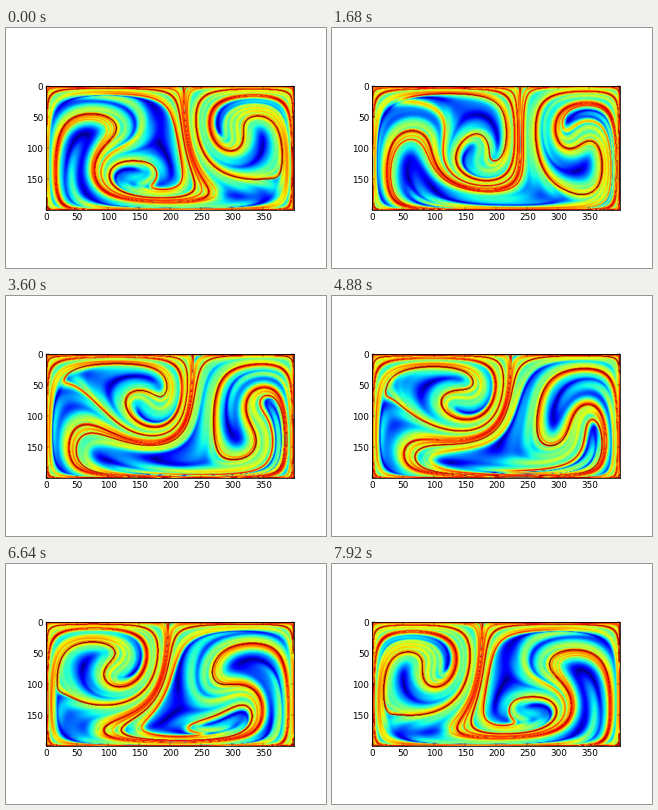
A matplotlib script that plays this animation: 320x240 px, repeating every 8000 ms.

```python
"""Finite-time Lyapunov exponent of the time-periodic double gyre."""
import math

import matplotlib.pyplot as plt
import numpy as np
from matplotlib.animation import FuncAnimation

NX, NY = 400, 200
AMP, EPS, OMEGA = 0.1, 0.25, 2 * math.pi / 10
SPAN, DT = 20.0, 0.25          # integration time and step
STATES, STATE_DT = 51, 0.1     # start times of the maps

x0 = np.linspace(0, 2, NX, dtype=np.float32)
y0 = np.linspace(0, 1, NY, dtype=np.float32)
GRID = np.array(np.meshgrid(x0, y0))


def velocity(p, t):
    x, y = p
    a = EPS * math.sin(OMEGA * t)
    f = math.pi * x * (a * x + (1 - 2 * a))
    slope = 2 * a * (x - 1) + 1
    y = math.pi * y
    v = np.empty_like(p)
    v[0] = -np.sin(f) * np.cos(y)
    v[1] = np.cos(f) * np.sin(y) * slope
    v *= math.pi * AMP
    return v


def rk4_step(p, t, k1):
    k2 = velocity(p + DT / 2 * k1, t + DT / 2)
    k3 = velocity(p + DT / 2 * k2, t + DT / 2)
    k4 = velocity(p + DT * k3, t + DT)
    return p + DT / 6 * (k1 + 2 * k2 + 2 * k3 + k4)


def flow_map(t):
    """Adams-Bashforth 4, started with Runge-Kutta steps."""
    p, past = GRID, []
    for _ in range(round(SPAN / DT)):
        past = [velocity(p, t)] + past[:3]
        if len(past) < 4:
            p = rk4_step(p, t, past[0])
        else:
            a, b, c, d = past
            p = p + DT / 24 * (55 * a - 59 * b + 37 * c - 9 * d)
        t += DT
    return p


def ftle(t):
    """Log of the largest stretching of the flow map started at t."""
    p = flow_map(t)
    dy, dx = np.gradient(p, 1 / (NY - 1), 2 / (NX - 1), axis=(1, 2))
    c11, c22, c12 = (dx**2).sum(0), (dy**2).sum(0), (dx * dy).sum(0)
    top = (c11 + c22) / 2 + np.hypot((c11 - c22) / 2, c12)
    return np.log(np.maximum(top, 1e-6)) / (2 * SPAN)


fields = [ftle(k * STATE_DT) for k in range(STATES)]

plt.rcParams.update({
    "font.family": "DejaVu Sans",
    "font.size": 8,
    "axes.linewidth": 0.7,
})
fig = plt.figure(figsize=(4, 3), dpi=80, facecolor="white")
ax = fig.add_axes([0.125, 0.1, 0.775, 0.8])
image = ax.imshow(fields[0], cmap="jet", vmin=0, vmax=5.3 / SPAN,
                  interpolation="bilinear", interpolation_stage="rgba")
ax.set_xticks(range(0, NX, 50))
ax.set_yticks(range(0, NY, 50))
ax.tick_params(direction="in", top=True, right=True,
               length=2.7, width=0.35, pad=2.5)


def draw(i):
    image.set_data(fields[(i + 1) // 2])
    return [image]


anim = FuncAnimation(fig, draw, frames=100, interval=80, repeat=True)
plt.show()
```
